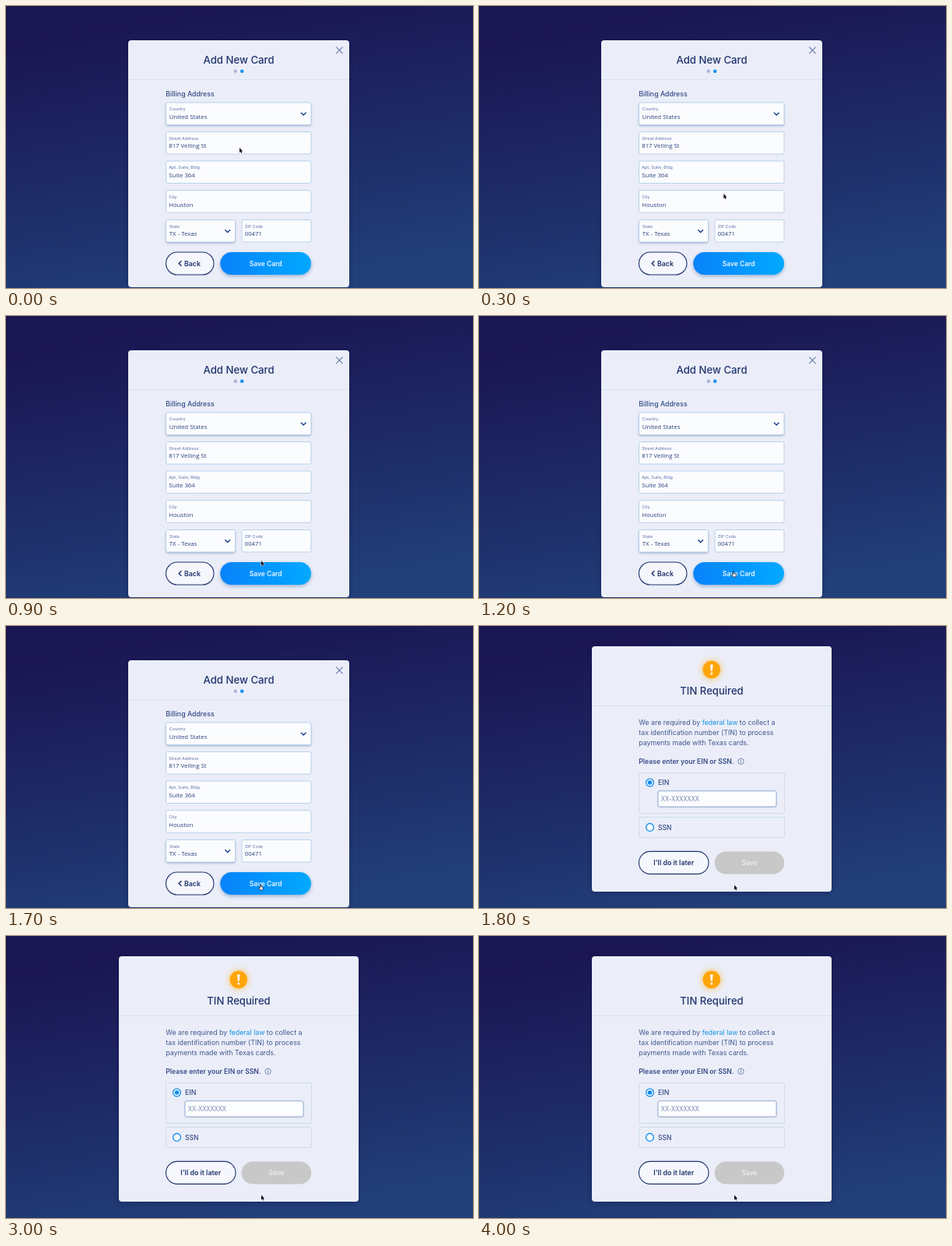
An HTML page with a canvas for the animation above (4.3 s loop, 600 by 362 pixels).

```html
<!DOCTYPE html>
<html lang="en">
<head>
<meta charset="utf-8">
<title>Card form</title>
<style>
html, body { margin: 0; width: 100%; height: 100%; overflow: hidden; background: #1c2560; }
canvas { display: block; width: 600px; height: 362px; }
</style>
</head>
<body>
<canvas id="stage"></canvas>
<script>
const W = 600, H = 362, LOOP = 4300, STEP = 100, DIALOG_AT = 1800;
const canvas = document.getElementById('stage');
const ctx = canvas.getContext('2d');
const ratio = window.devicePixelRatio || 1;
canvas.width = W * ratio;
canvas.height = H * ratio;
ctx.scale(ratio, ratio);

const UI = 'Inter, sans-serif';
const VALUE = '"Open Sans", sans-serif';
const NAVY = '#20346f', INK = '#2b427f', SOFT = '#7585b5', BLUE = '#118cee';

// Cursor stops: time, x, y
const stops = [[0, 300, 182], [600, 328.6, 300], [1200, 327, 328], [1700, 327, 332]];

function text(str, x, y, size, color, opt = {}) {
  ctx.font = `${opt.weight || 400} ${size}px ${opt.family || UI}`;
  ctx.letterSpacing = (opt.space || 0) + 'px';
  ctx.textAlign = opt.align || 'left';
  ctx.fillStyle = color;
  ctx.fillText(str, x, y);
  return ctx.measureText(str).width;
}

function box(x, y, w, h, r, fill, stroke, line = 1) {
  ctx.beginPath();
  ctx.roundRect(x, y, w, h, r);
  if (fill) { ctx.fillStyle = fill; ctx.fill(); }
  clearShadow();
  if (stroke) { ctx.strokeStyle = stroke; ctx.lineWidth = line; ctx.stroke(); }
}

function disc(x, y, r, fill, stroke, line = 1) {
  ctx.beginPath();
  ctx.arc(x, y, r, 0, Math.PI * 2);
  if (fill) { ctx.fillStyle = fill; ctx.fill(); }
  clearShadow();
  if (stroke) { ctx.strokeStyle = stroke; ctx.lineWidth = line; ctx.stroke(); }
}

function path(points, color, line) {
  ctx.beginPath();
  points.forEach(([x, y]) => ctx.lineTo(x, y));
  ctx.strokeStyle = color;
  ctx.lineWidth = line;
  ctx.stroke();
}

function shadow(color, blur, dy) {
  ctx.shadowColor = color;
  ctx.shadowBlur = blur * ratio;
  ctx.shadowOffsetY = dy * ratio;
}

function clearShadow() {
  ctx.shadowColor = 'transparent';
  ctx.shadowBlur = ctx.shadowOffsetY = 0;
}

function backdrop() {
  const g = ctx.createLinearGradient(270, 0, 330, H);
  g.addColorStop(0, '#1a1553');
  g.addColorStop(0.5, '#1d2965');
  g.addColorStop(1, '#213f79');
  ctx.fillStyle = g;
  ctx.fillRect(0, 0, W, H);
}

function panel(x, y, w, h, lineY) {
  shadow('rgba(10,14,60,0.35)', 8, 1);
  box(x, y, w, h, 4, '#ebeef8');
  ctx.fillStyle = '#d3e5f5';
  ctx.fillRect(x, lineY, w, 1);
}

function field(label, value, x, y, w, isSelect) {
  if (isSelect) shadow('rgba(50,80,140,0.4)', 3, 1.5);
  box(x, y, w, 28.5, 2, '#fbfcfe', '#b3cde8', 0.9);
  const left = x + (isSelect ? 4.3 : 3.7);
  text(label, left, y + 10.2, 5.4, SOFT, { weight: 500 });
  text(value, left, y + 20.8, 7.8, INK, { family: VALUE });
  if (isSelect) {
    const cx = x + w - 9.8, cy = y + 14.5;
    path([[cx - 3.3, cy - 1.8], [cx, cy + 1.6], [cx + 3.3, cy - 1.8]], '#1c3f8f', 1.4);
  }
}

function pill(label, x, y, w, color, fill, stroke, size) {
  box(x, y, w, 29, 14.5, fill, stroke, 1.1);
  text(label, x + w / 2, y + 17.7, size, color, { weight: 600, align: 'center' });
}

function drawForm() {
  panel(157, 44, 284, 317, 94);
  text('Add New Card', 299, 73.6, 13.2, NAVY, { weight: 500, align: 'center' });
  disc(294.8, 83.8, 2.2, '#a9b5d8');
  disc(303.2, 83.8, 2.3, '#1890f2');
  path([[424.2, 52.7], [432.6, 61.1]], '#6577ac', 1.1);
  path([[432.6, 52.7], [424.2, 61.1]], '#6577ac', 1.1);

  text('Billing Address', 205.3, 115.6, 8.75, '#354a87', { weight: 500 });
  field('Country', 'United States', 205.5, 124, 186.5, true);
  field('Street Address', '817 Velling St', 205.5, 161.5, 186.5);
  field('Apt, Suite, Bldg', 'Suite 364', 205.5, 199, 186.5);
  field('City', 'Houston', 205.5, 236.7, 186.5);
  field('State', 'TX - Texas', 205.5, 274.5, 89, true);
  field('ZIP Code', '00471', 303, 274.5, 89);

  box(205.5, 316, 61.5, 29, 14.5, '#f5f7fc', NAVY, 1.1);
  path([[225.4, 327.2], [222.2, 330.5], [225.4, 333.8]], NAVY, 1.5);
  text('Back', 229, 333.7, 8.8, NAVY, { weight: 600 });

  const g = ctx.createLinearGradient(275, 0, 392, 0);
  g.addColorStop(0, '#0883fa');
  g.addColorStop(1, '#02a9ff');
  shadow('rgba(30,80,150,0.4)', 5, 2);
  pill('Save Card', 275.3, 316, 116.7, '#e9f5ff', g, null, 8.5);
}

function radio(x, y, on) {
  disc(x, y, 4.9, '#fbfcfe', BLUE, 1.3);
  if (on) disc(x, y, 2.8, BLUE);
}

function drawDialog() {
  panel(145, 26, 308, 315, 102);
  shadow('rgba(255,180,40,0.9)', 9, 0);
  disc(298.8, 56, 11.2, '#ffa508');
  ctx.fillStyle = '#fff';
  ctx.beginPath();
  ctx.moveTo(297, 49.5);
  ctx.lineTo(300.6, 49.5);
  ctx.lineTo(299.8, 58);
  ctx.lineTo(297.8, 58);
  ctx.fill();
  disc(298.8, 61, 1.5, '#fff');
  text('TIN Required', 299, 87.8, 13.1, NAVY, { weight: 500, align: 'center' });

  let x = 205.3;
  x += text('We are required by ', x, 127.4, 8.8, '#40578f');
  x += text('federal law', x, 127.4, 8.8, '#1291e4');
  text(' to collect a', x, 127.4, 8.8, '#40578f');
  text('tax identification number (TIN) to process', 205.3, 140, 8.8, '#40578f');
  text('payments made with Texas cards.', 205.3, 152.6, 8.8, '#40578f');

  text('Please enter your EIN or SSN.', 205.3, 177, 8.6, '#354a87', { weight: 600 });
  disc(336.5, 173.8, 3.7, null, '#4c6096', 0.7);
  text('i', 336.5, 176.1, 6, '#40558f', { weight: 500, align: 'center' });

  box(205.5, 188.5, 187, 52, 1, null, '#cbdcec', 1);
  radio(219.5, 201, true);
  text('EIN', 230, 204.3, 8.8, '#354a87', { weight: 500 });
  shadow('rgba(50,80,140,0.35)', 2, 0.5);
  box(230, 211.8, 152, 20.2, 2, '#fcfdff', '#8fa5cc', 0.9);
  text('XX-XXXXXXX', 234, 225, 8.2, '#6e7fae', { family: VALUE, space: 0.4 });

  box(205.5, 245.5, 187, 26, 1, null, '#cbdcec', 1);
  radio(219.5, 258.4, false);
  text('SSN', 230, 261.7, 8.5, '#354a87', { weight: 500 });

  pill("I'll do it later", 205.5, 289.4, 89.5, NAVY, '#f5f7fc', NAVY, 8.8);
  pill('Save', 302.7, 289.4, 89.5, '#ececec', '#c8c8c8', null, 8.4);
}

function arrow(x, y) {
  const shape = [[0, 0], [0, 6.2], [1.4, 5], [2.3, 7], [3.3, 6.5], [2.4, 4.6], [4.2, 4.4]];
  ctx.beginPath();
  shape.forEach(([dx, dy]) => ctx.lineTo(x + dx, y + dy));
  ctx.closePath();
  ctx.strokeStyle = '#fff';
  ctx.lineWidth = 1;
  ctx.stroke();
  ctx.fillStyle = '#080a14';
  ctx.fill();
}

function hand(x, y) {
  const shape = [[-0.6, 0], [0.5, 0], [0.7, 2.3], [3.1, 3], [3.4, 5], [2.6, 7],
    [-0.5, 7], [-2.4, 4.3], [-1.7, 3.7], [-0.7, 4.5]];
  ctx.beginPath();
  shape.forEach(([dx, dy]) => ctx.lineTo(x + dx, y + dy));
  ctx.closePath();
  ctx.fillStyle = '#fff';
  ctx.fill();
  ctx.strokeStyle = '#10142a';
  ctx.lineWidth = 0.75;
  ctx.stroke();
}

function cursorAt(t) {
  for (let i = 1; i < stops.length; i++) {
    const [t0, x0, y0] = stops[i - 1], [t1, x1, y1] = stops[i];
    if (t <= t1) {
      const p = (t - t0) / (t1 - t0), e = p * p * (3 - 2 * p);
      return [x0 + (x1 - x0) * e, y0 + (y1 - y0) * e];
    }
  }
  return stops[stops.length - 1].slice(1);
}

function draw(time) {
  const t = Math.floor((time % LOOP) / STEP) * STEP;
  backdrop();
  if (t < DIALOG_AT) {
    drawForm();
    const [x, y] = cursorAt(t);
    (y > 316 ? hand : arrow)(x, y);
  } else {
    drawDialog();
    arrow(328, 332.5);
  }
}

const start = performance.now();
function tick() {
  draw(performance.now() - start);
  requestAnimationFrame(tick);
}
tick();
</script>
</body>
</html>
```
